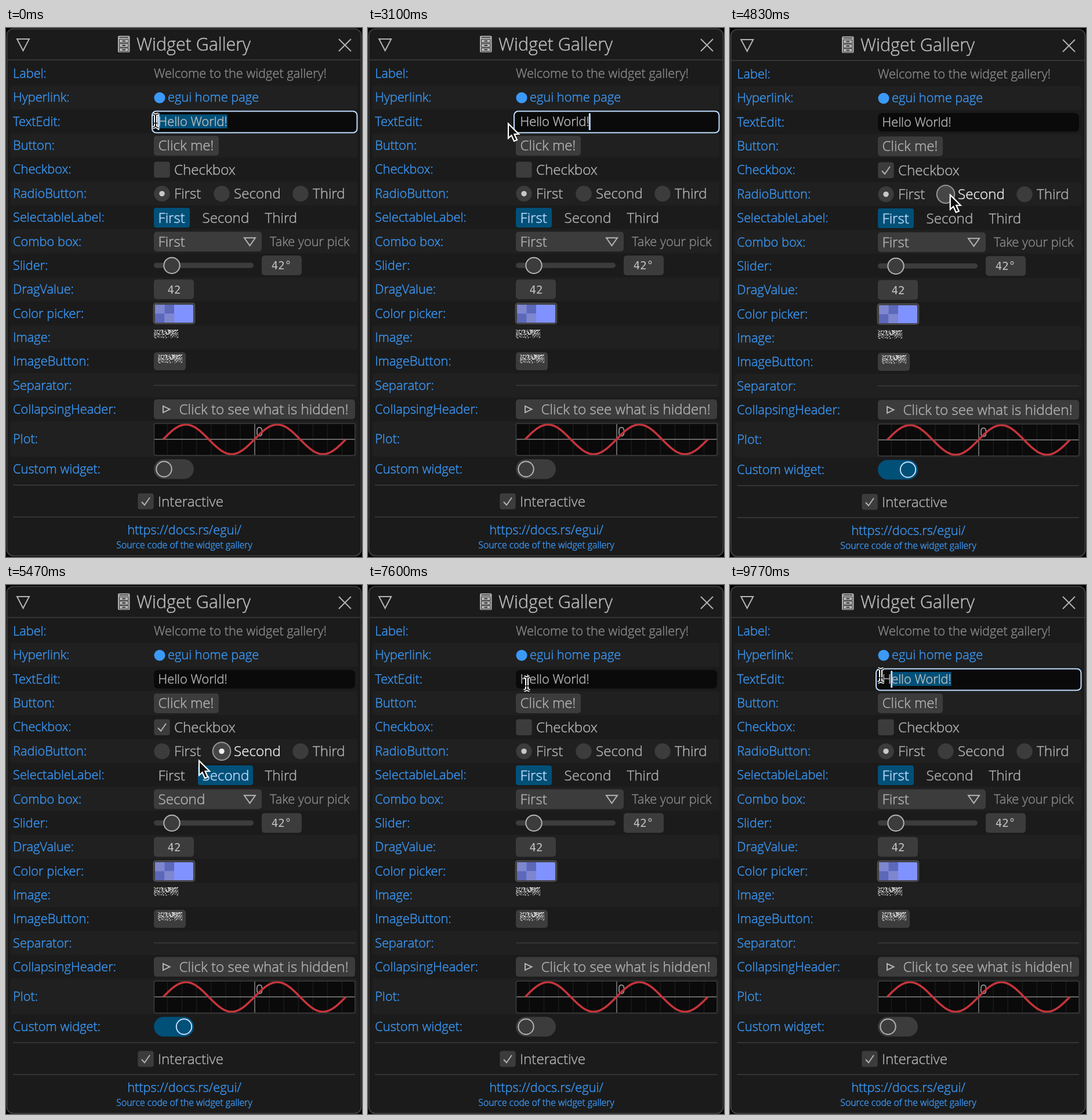
Recreate the animation shown at these times as an HTML page with a canvas. Size 614x912 px, loop 9810 ms.

```html
<!DOCTYPE html>
<html>
<head>
<meta charset="utf-8">
<title>Widget Gallery</title>
<style>
html, body { margin: 0; width: 100%; height: 100%; overflow: hidden; background: #000; }
canvas { display: block; }
</style>
</head>
<body>
<canvas id="stage" width="614" height="912"></canvas>
<script>
const ctx = document.getElementById('stage').getContext('2d');
const LOOP = 9810;
const BODY = 21.8, BUTTON = 24.2, HEADING = 30.4, SMALL = 15.8;
const LINK = '#3b99f8', FILL = '#3c3c3c', LINE = '#3c3c3c', TEXT = '#b4b4b4', WEAK = '#8c8c8c';
const SELECT = '#005078', SELECT_TEXT = '#c0deff', DARK = '#0a0a0a';
const GREETING = 'Hello World!';
const TYPED_AT = [1030, 1270, 1400, 1500, 1620, 1730, 1870, 2070, 2150, 2240, 2330, 2470];
const LABELS = ['Label', 'Hyperlink', 'TextEdit', 'Button', 'Checkbox', 'RadioButton', 'SelectableLabel',
  'Combo box', 'Slider', 'DragValue', 'Color picker', 'Image', 'ImageButton', 'Separator',
  'CollapsingHeader', 'Plot', 'Custom widget'];
// Pointer stops: time, x, y
const POINTER = [
  [0, 258, 160], [900, 242, 165], [3100, 242, 165], [3560, 292, 762], [3800, 292, 762],
  [4070, 341, 246], [4430, 341, 246], [4850, 380, 288], [5150, 380, 288], [5470, 333, 303],
  [5800, 297, 330], [6430, 297, 330], [6650, 292, 762], [6740, 292, 762], [6920, 300, 244],
  [7400, 300, 244], [7600, 274, 170], [8000, 470, 130], [8470, 470, 130], [9030, 397, 145],
  [9400, 384, 163], [9470, 384, 163], [9770, 260, 156], [9810, 258, 160]];

const clamp = v => Math.max(0, Math.min(1, v));
const between = (t, a, b) => t >= a && t < b;
const rowY = i => i < 15 ? 78.3 + 41.36 * i : i === 15 ? 708.5 : 760.5;

function pointerAt(t) {
  const i = Math.max(1, POINTER.findIndex(p => p[0] >= t));
  const [t0, x0, y0] = POINTER[i - 1], [t1, x1, y1] = POINTER[i];
  const u = clamp((t - t0) / (t1 - t0)), k = u * u * (3 - 2 * u);
  return { x: x0 + (x1 - x0) * k, y: y0 + (y1 - y0) * k };
}

function setFont(size) {
  ctx.font = `300 ${size}px "Open Sans", sans-serif`;
}
function text(str, x, y, size = BODY, color = TEXT, align = 'left') {
  setFont(size);
  ctx.fillStyle = ctx.strokeStyle = color;
  ctx.textAlign = align;
  ctx.fillText(str, x, y + size * 0.355);
  // A hairline outline lifts the light weight a little
  ctx.lineWidth = 0.45;
  ctx.strokeText(str, x, y + size * 0.355);
}
function mono(str, x, y) {
  ctx.font = '19px "DejaVu Sans Mono", monospace';
  ctx.fillStyle = '#c4c4c4';
  ctx.textAlign = 'center';
  ctx.fillText(str, x, y + 7);
}
function paint(fill, stroke, width = 2) {
  if (fill) { ctx.fillStyle = fill; ctx.fill(); }
  if (stroke) { ctx.strokeStyle = stroke; ctx.lineWidth = width; ctx.stroke(); }
}
function box(x0, y0, x1, y1, r, fill, stroke, width) {
  ctx.beginPath();
  ctx.roundRect(x0, y0, x1 - x0, y1 - y0, r);
  paint(fill, stroke, width);
}
function circle(x, y, r, fill, stroke) {
  ctx.beginPath();
  ctx.arc(x, y, r, 0, 2 * Math.PI);
  paint(fill, stroke);
}
function path(points, stroke, width = 2, closed = false, fill) {
  ctx.beginPath();
  points.forEach(([x, y]) => ctx.lineTo(x, y));
  if (closed) ctx.closePath();
  paint(fill, stroke, width);
}
const line = (x0, y0, x1, y1, color = LINE, width = 1.5) => path([[x0, y0], [x1, y1]], color, width);

function titleBar() {
  path([[19, 19], [40, 19], [29.5, 39]], TEXT, 2, true);
  path([[574, 19], [595, 40]], TEXT);
  path([[595, 19], [574, 40]], TEXT);
  box(193, 13.5, 213.5, 42, 2, TEXT);
  box(195.5, 15.5, 211, 17, 0, '#333');
  for (const y of [19.5, 27, 34.5]) {
    box(195.5, y, 211, y + 6, 0, null, '#333', 1);
    box(200.5, y + 2, 206, y + 4, 0, '#333');
  }
  text('Widget Gallery', 225, 28.5, HEADING, '#bebebe');
  line(2, 55, 612, 55);
}

function checkbox(x, y, label, checked, hovered) {
  const grow = hovered ? 1.5 : 0;
  box(x - 13.7 - grow, y - 13.7 - grow, x + 13.7 + grow, y + 13.7 + grow, 4,
    hovered ? '#464646' : FILL, hovered && '#969696');
  const color = hovered ? '#f0f0f0' : TEXT;
  if (checked) path([[x - 7, y + 1], [x - 2, y + 6.5], [x + 7, y - 6.5]], color);
  text(label, x + 21, y, BUTTON, color);
}

function radio(x, y, label, chosen, hovered) {
  circle(x, y, hovered ? 15.3 : 13.7, hovered ? '#464646' : FILL, hovered && '#969696');
  if (chosen) circle(x, y, 4.7, hovered ? '#f0f0f0' : '#c8c8c8');
  text(label, x + 21, y, BUTTON, hovered ? '#f0f0f0' : TEXT);
}

function speckles(x, y) {
  let seed = 7;
  const random = () => (seed = seed * 16807 % 2147483647) / 2147483647;
  for (let j = 0; j < 15; j++) {
    for (let i = 0; i < 42; i++) {
      const density = j < 9 ? 0.6 : 0.3;
      if (random() < density) {
        ctx.fillStyle = `rgba(255,255,255,${0.4 + 0.6 * random()})`;
        ctx.fillRect(x + i, y + j, 1, 1);
      }
    }
  }
}

function textEdit(t) {
  const dragging = t >= 9430;
  const focused = t < 3640 || dragging;
  const y = rowY(2);
  const typed = TYPED_AT.filter(at => at <= t).length;
  const typing = between(t, TYPED_AT[0], 3640);
  const shown = typing ? GREETING.slice(0, typed) : GREETING;
  if (focused) box(252, y - 17.5, 605.5, y + 19.5, 7, DARK, SELECT_TEXT);
  else box(255, y - 15.5, 602, y + 16.5, 7, DARK);

  setFont(BODY);
  const edge = n => 262.5 + ctx.measureText(GREETING.slice(0, n)).width;
  let caret = typing ? typed : 0;
  if (dragging) {
    // The selection trails the pointer slightly
    const x = pointerAt(t - 60).x;
    while (caret < GREETING.length && (edge(caret) + edge(caret + 1)) / 2 < x) caret++;
  }
  if (focused && !typing) box(edge(caret), y - 12, edge(12), y + 12, 0, SELECT);
  text(shown, 262.5, y, BODY, focused ? '#c0c0c0' : '#b9b9b9');
  if (focused) box(edge(caret) - 1, y - 14, edge(caret) + 2, y + 15, 0, SELECT_TEXT);
}

function plot() {
  const y = rowY(15) + 0.7;
  box(255.5, y - 27.5, 602, y + 27.5, 3, DARK);
  for (let k = -6; k <= 6; k++) line(429 + 25.1 * k, y - 27, 429 + 25.1 * k, y + 27, '#1b1b1b', 1.5);
  line(256, y, 602, y, '#747474', 1.7);
  line(429, y - 27, 429, y + 27, '#747474', 1.7);
  text('0', 431, y - 13, BODY, '#aaa');
  const wave = [];
  for (let x = 271; x <= 586.5; x += 1.5) wave.push([x, y - 25.5 * Math.sin((x - 271) * 4 * Math.PI / 315)]);
  path(wave, '#c5343b', 3.6);
  box(255.5, y - 27.5, 602, y + 27.5, 3, null, LINE, 1.5);
}

function toggle(t) {
  const y = rowY(16);
  const on = clamp((t - 3650) / 100) - clamp((t - 6700) / 100);
  const mix = (a, b) => a + (b - a) * on;
  const hovered = between(t, 3540, 3820) || between(t, 6640, 6760);
  const fill = `rgb(${mix(60, 0)},${mix(60, 80)},${mix(60, 120)})`;
  box(255, y - 17, 324, y + 17, 17, fill, hovered && '#969696');
  circle(mix(272.5, 307), y, 13.2, fill, `rgb(${mix(180, 192)},${mix(180, 222)},${mix(180, 255)})`);
}

function widgets(t, mouse) {
  const second = between(t, 5000, 6030);
  const options = ['First', 'Second', 'Third'];
  const chosen = second ? 1 : 0;

  text('Welcome to the widget gallery!', 255, rowY(0), BODY, WEAK);
  circle(265, rowY(1) + 0.5, 9.5, LINK);
  text('egui home page', 279, rowY(1), BODY, LINK);
  textEdit(t);

  box(255, rowY(3) - 16.5, 367, rowY(3) + 17.5, 5, FILL);
  text('Click me!', 262.5, rowY(3) + 0.5, BUTTON);

  const overCheck = mouse.x > 252 && mouse.x < 398 && Math.abs(mouse.y - rowY(4)) < 17;
  checkbox(269, rowY(4) + 0.5, 'Checkbox', between(t, 4180, 7150), overCheck);

  [269, 372, 508].forEach((x, i) =>
    radio(x, rowY(5) + 0.5, options[i], i === chosen, i === 1 && between(t, 4780, 5490)));

  [[255, 317], [331, 426], [439, 510]].forEach(([x0, x1], i) => {
    const y = rowY(6) + 0.5;
    const hovered = i === 0 && between(t, 5650, 6500);
    if (i === chosen) box(x0, y - 17, x1, y + 17, 4, SELECT);
    else if (hovered) box(x0, y - 17, x1, y + 17, 4, '#464646', '#969696');
    text(options[i], x0 + 7.5, y, BUTTON, i === chosen ? SELECT_TEXT : hovered ? '#f0f0f0' : TEXT);
  });

  const comboY = rowY(7) + 0.5;
  box(255, comboY - 17, 441, comboY + 17, 5, FILL);
  text(options[chosen], 262.5, comboY, BUTTON);
  path([[411, comboY - 6.5], [430, comboY - 6.5], [420.5, comboY + 7]], TEXT, 2, true);
  text('Take your pick', 455, comboY - 0.5, BODY, WEAK);

  const sliderY = rowY(8);
  box(255, sliderY - 4.5, 427, sliderY + 4.5, 4.5, FILL);
  circle(286, sliderY + 0.3, 13.7, FILL, TEXT);
  box(441, sliderY - 17, 510, sliderY + 17, 5, FILL);
  mono('42°', 475, sliderY);

  box(255, rowY(9) - 17, 324, rowY(9) + 17, 5, FILL);
  mono('42', 290, rowY(9));

  const colorY = rowY(10);
  box(254.5, colorY - 17.5, 325.5, colorY + 18, 4, FILL, '#4c4c50', 1.8);
  box(257, colorY - 15, 323, colorY + 16, 2, '#8092ff');
  for (let i = 0; i < 4; i++) {
    const x = 257 + (i % 2) * 16.5, y = colorY - 15 + (i >> 1) * 15.5;
    box(x, y, x + 16.5, y + 15.5, 0, i === 0 || i === 3 ? '#7e86ce' : '#5d68b9');
  }

  speckles(255, Math.round(rowY(11)) - 13);
  box(255, rowY(12) - 15.5, 310, rowY(12) + 15.5, 5, FILL);
  speckles(262, Math.round(rowY(12)) - 12);
  line(255, rowY(13), 602, rowY(13));

  const headerY = rowY(14);
  box(255, headerY - 17, 602, headerY + 17, 5, FILL);
  path([[271, headerY - 5.5], [282.5, headerY], [271, headerY + 5.5]], TEXT, 2, true);
  text('Click to see what is hidden!', 298.5, headerY + 0.5, BUTTON);

  plot();
  toggle(t);
}

function footer() {
  line(12, 788, 602, 788);
  checkbox(241, 816, 'Interactive', true, false);
  line(12, 843, 602, 843);
  text('https://docs.rs/egui/', 307.5, 865, BODY, LINK, 'center');
  text('Source code of the widget gallery', 307.5, 891, SMALL, LINK, 'center');
}

function drawPointer(t, { x, y }) {
  const overText = (x > 252 && x < 604 && y > 146.5 && y < 181) || t >= 9430;
  if (overText) {
    for (const [color, width] of [['#fff', 6], ['#111', 2]]) {
      path([[x, y - 11], [x, y + 11]], color, width);
      path([[x - 5, y - 12], [x, y - 10], [x + 5, y - 12]], color, width * 0.8);
      path([[x - 5, y + 12], [x, y + 10], [x + 5, y + 12]], color, width * 0.8);
      path([[x - 3, y + 4], [x + 3, y + 4]], color, width * 0.8);
    }
    return;
  }
  const arrow = [[0, 0], [0, 25], [5.5, 20], [10, 30], [15, 28], [10.5, 18], [18, 18]];
  path(arrow.map(([dx, dy]) => [x + dx, y + dy]), '#fff', 2.2, true, '#111');
}

function draw(t) {
  const mouse = pointerAt(t);
  ctx.fillStyle = '#000';
  ctx.fillRect(0, 0, 614, 912);
  ctx.save();
  ctx.translate(0, t < 4470 ? 0 : 1);
  box(1.5, 1.5, 612.5, 910, 11, '#1b1b1b', '#444', 1.7);
  titleBar();
  LABELS.forEach((label, i) => {
    const half = i === 15 ? 31 : 20.7;
    if (i % 2) box(8, rowY(i) - half, 606, rowY(i) + half, 3, '#202020');
    text(label + ':', 12, rowY(i), BODY, LINK);
  });
  widgets(t, mouse);
  footer();
  ctx.restore();
  drawPointer(t, mouse);
}

function tick(now) {
  draw(now % LOOP);
  requestAnimationFrame(tick);
}
requestAnimationFrame(tick);
</script>
</body>
</html>
```
